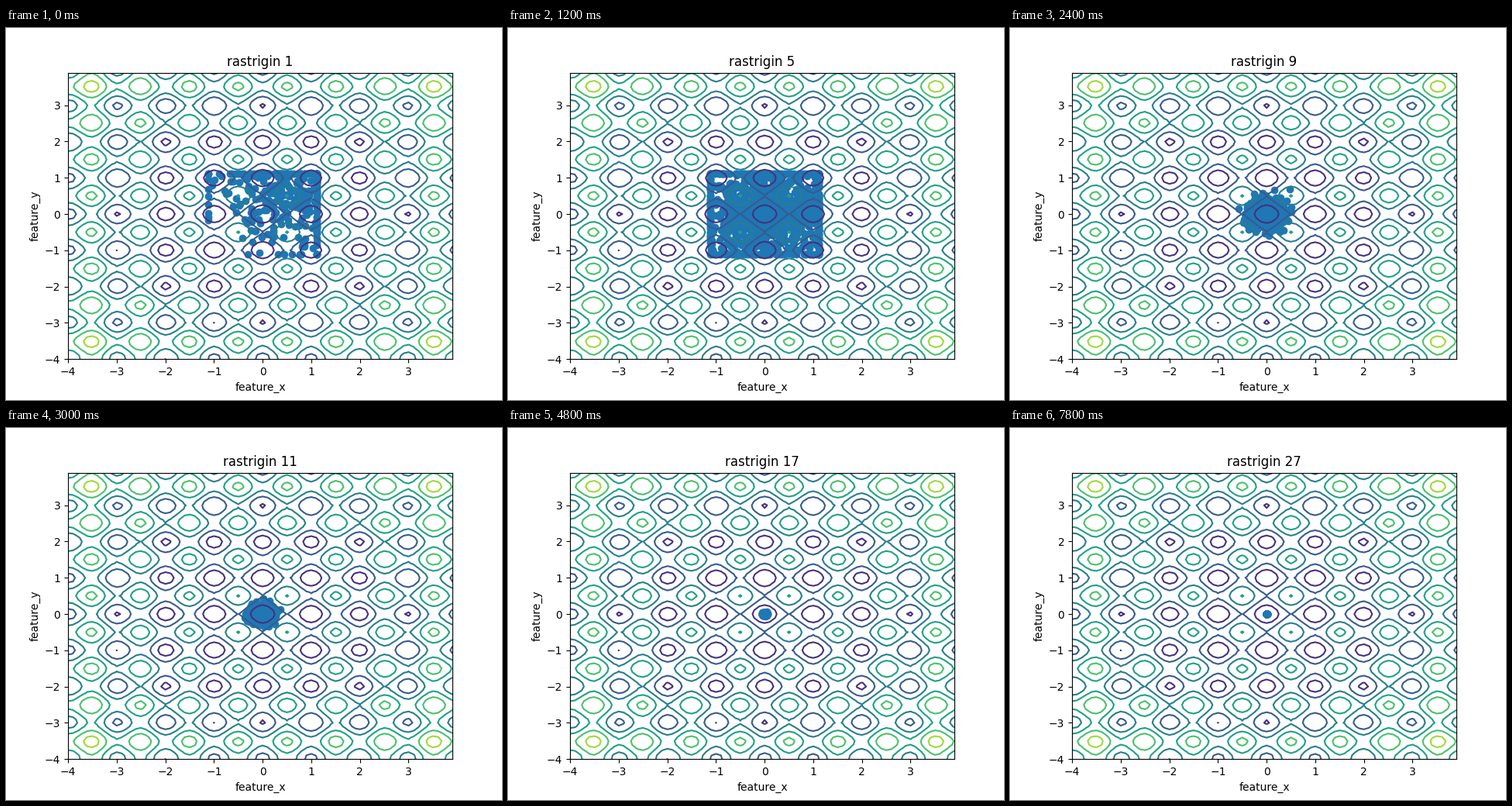
Recreate the animation shown at these times as a matplotlib script. Size 640 by 480 pixels, loop 8 s.

```python
import matplotlib.pyplot as plt
import numpy as np
from matplotlib.animation import FuncAnimation

BOUND = 1.12
FRAMES, INTERVAL, HOLD = 80, 100, 3  # each swarm step is held for 300 ms

# swarm spread, keyed by step and interpolated on a log scale
STEPS = [0, 4, 5, 6, 7, 8, 12, 14, 20, 26]
SPREAD = [0.8, 0.8, 0.5, 0.31, 0.28, 0.18, 0.076, 0.033, 0.006, 0.003]


def rastrigin(x, y):
    return 20 + sum(v**2 - 10 * np.cos(2 * np.pi * v) for v in (x, y))


def swarm(step):
    """Particles drift to the origin, then contract around it."""
    rng = np.random.default_rng(40 + step)
    spread = np.exp(np.interp(step, STEPS, np.log(SPREAD)))
    center = np.interp(step, [0, 4, 6], [0.6, 0.07, 0])
    count = int(np.interp(step, [0, 4], [350, 1000]))
    points = center + spread * rng.standard_normal((count, 2))
    return np.clip(points, -BOUND, BOUND)


fig, ax = plt.subplots(figsize=(6.4, 4.8), dpi=100)
axis = np.arange(-4, 4, 0.1)
X, Y = np.meshgrid(axis, axis)
ax.contour(X, Y, rastrigin(X, Y))
dots = ax.scatter([], [], color="C0", zorder=1)
ax.set(xlim=(axis[0], axis[-1]), ylim=(axis[0], axis[-1]),
       xlabel="feature_x", ylabel="feature_y")
title = ax.set_title("rastrigin 1")


def update(frame):
    step = frame // HOLD
    dots.set_offsets(swarm(step))
    title.set_text(f"rastrigin {step + 1}")
    return dots, title


anim = FuncAnimation(fig, update, frames=FRAMES, interval=INTERVAL,
                     repeat=True, repeat_delay=0, blit=False)
plt.show()
```
